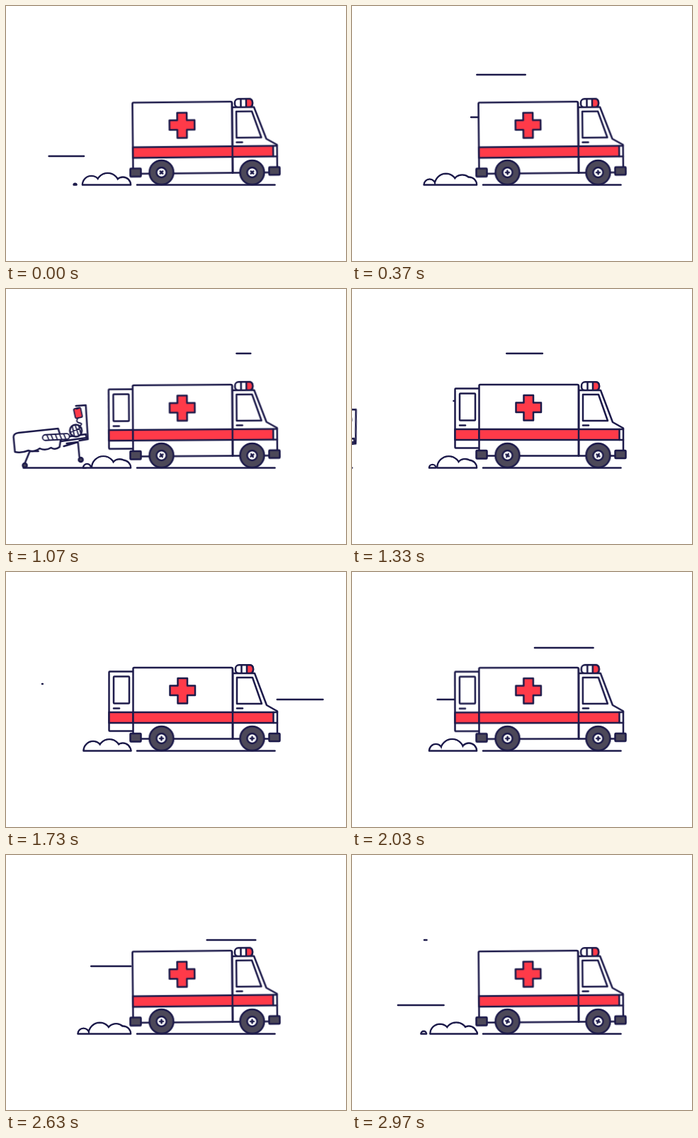
Write an HTML page that moves like this. It is 480 by 360 pixels and loops after 3.01 s.

```html
<!DOCTYPE html>
<html lang="en">
<head>
<meta charset="utf-8">
<title>Ambulance</title>
<style>
  html, body { margin: 0; width: 100%; height: 100%; overflow: hidden; background: #fff; }
  svg { display: block; width: 480px; height: 360px; }
  .ink { fill: none; stroke: #1c1a4a; stroke-width: 2.5; stroke-linecap: round; stroke-linejoin: round; }
  .white { fill: #fff; }
  .red { fill: #ff3a49; }
  .grey { fill: #4c4859; }
  .thin { stroke-width: 1.8; }

  .van { transform-origin: 320px 236px; animation: wobble 376.25ms -357ms ease-in-out infinite; }
  .door { transform-origin: 180px 0; animation: door 3010ms ease-out infinite; }
  .hand { animation: hand 3010ms ease-in-out infinite; }
  .roll { animation: roll 3010ms linear infinite; }
  .bed { transform-origin: 27px 249px; animation: bed 3010ms linear infinite; }
  .hub { animation: spin 602ms linear infinite; }

  @keyframes wobble {
    0%, 100% { transform: rotate(-.6deg); }
    50% { transform: none; }
  }
  @keyframes door {
    0%, 22.9% { transform: scaleX(0); visibility: hidden; }
    23% { transform: scaleX(.05); visibility: visible; }
    26.6%, 81% { transform: none; visibility: visible; }
    86.3% { transform: scaleX(.05); visibility: visible; }
    86.4%, 100% { transform: scaleX(0); visibility: hidden; }
  }
  @keyframes hand {
    0%, 73.5% { transform: translateX(14px); }
    77%, 100% { transform: none; }
  }
  @keyframes roll {
    0%, 23.26% { transform: translateX(182px); }
    35.55% { transform: none; }
    46.51%, 100% { transform: translateX(-143px); }
  }
  @keyframes bed {
    0%, 23.26% { transform: translateY(-18px) rotate(4deg); }
    28.24% { transform: translateY(-14px) rotate(2deg); }
    32.23% { transform: rotate(-3deg); }
    35.55% { transform: none; }
    39.87%, 100% { transform: rotate(4deg); }
  }
  @keyframes spin { to { transform: rotate(360deg); } }
</style>
</head>
<body>
<svg viewBox="0 0 480 360">
  <defs>
    <clipPath id="outside"><rect width="179" height="360"/></clipPath>
    <clipPath id="above"><rect width="480" height="252.5"/></clipPath>
    <g id="wheel">
      <circle class="ink grey" r="17"/>
      <circle class="ink white" r="7"/>
    </g>
  </defs>

  <path id="wind" class="ink"/>

  <g clip-path="url(#outside)">
    <g class="roll ink">
      <path d="M25 252.5H113"/>
      <g class="bed">
        <path d="M27 246L34 229H46M104 237L102 216L82 222M102 216L86 218"/>
        <circle class="grey" cx="27" cy="249" r="3"/>
        <circle class="grey" cx="106" cy="241" r="3"/>
        <path class="white" d="M99 165L113 164L116 212L104 214"/>
        <path class="white" d="M76 210L113 205L114 210L78 215Z"/>
        <path class="thin" d="M102 182Q98 188 104 189T104 194"/>
        <rect class="red thin" x="97" y="168" width="10" height="14" rx="2" transform="rotate(-12 102 175)"/>
        <path d="M100 169L103 168"/>
        <circle class="white" cx="99" cy="200" r="8.5"/>
        <path class="thin" d="M94 194L97 208M98 192L103 207M103 193L106 204M92 202L106 196"/>
        <path class="white" d="M13 230L11 209Q11 204 18 203L74 197L78 210L76 223Q70 228 64 224Q56 229 48 225Q40 231 32 228Q22 232 13 230Z"/>
        <rect class="white thin" x="52" y="205" width="38" height="8" rx="4" transform="rotate(-3 70 209)"/>
        <path class="thin" d="M58 206L61 213M64 206L67 213M70 205L73 213M76 205L79 212M82 205L85 212"/>
      </g>
    </g>
  </g>

  <g clip-path="url(#above)">
    <path id="dustEdge" class="ink"/>
    <path id="dustFill" class="white"/>
  </g>
  <path id="dustBase" class="ink"/>

  <path class="ink" d="M185 252.5H379.500"/>

  <g class="van ink">
    <g class="door">
      <rect class="hand white" x="135" y="182.500" width="18" height="9" rx="4.5"/>
      <rect class="white" x="145.500" y="140.500" width="35" height="84" rx="1"/>
      <rect x="152" y="147.500" width="22" height="38" rx="1"/>
      <path d="M152 192.500H160"/>
      <rect class="red" x="145.500" y="198" width="35" height="15"/>
    </g>
    <rect class="white" x="324" y="131.300" width="25" height="12" rx="5"/>
    <path class="red" d="M340 131.300H344Q349 131.300 349 137.300T344 143.300H340Z"/>
    <path d="M332.500 131.300V143"/>
    <path class="white" d="M320 143H351L368 188L383 196.500V235.500H320Z"/>
    <path class="white" d="M181 135H318Q320 135 320 137V235.500H179.500V136.500Q179.500 135 181 135Z"/>
    <rect class="red" x="179.500" y="198" width="198" height="15"/>
    <path d="M377.500 198H383M377.500 213H383M320 137V235"/>
    <path class="white" d="M326 149H348L361 186H326Z"/>
    <path d="M326 192.500H334"/>
    <path class="red" d="M242.500 150H256V160.500H267V174H256V185.500H242.500V174H231.500V160.500H242.500Z"/>
    <rect class="grey" x="175.500" y="228" width="15" height="11.500" rx="1"/>
    <rect class="grey" x="371.500" y="228" width="15" height="11" rx="1"/>
  </g>

  <g transform="translate(219.500 235)">
    <use href="#wheel"/>
    <path class="ink hub" d="M-1.700 -1.700L1.700 1.700M1.700 -1.700L-1.700 1.700"/>
  </g>
  <g transform="translate(347.500 235)">
    <use href="#wheel"/>
    <path class="ink hub" d="M-1.700 -1.700L1.700 1.700M1.700 -1.700L-1.700 1.700"/>
  </g>
</svg>
<script>
  const LOOP = 3010, GROUND = 252.5;
  const el = id => document.getElementById(id);
  const clamp = (v, lo = 0, hi = 1) => Math.min(hi, Math.max(lo, v));
  const ease = p => (1 - Math.cos(Math.PI * clamp(p))) / 2;

  // y, right end, left end, start ms, travel ms, lag of the tail in ms
  const streaks = [
    [157, 404, 110, 60, 440, 90],
    [97, 380, 130, 70, 420, 80],
    [119, 390, 63, 500, 480, 90],
    [180, 445, 200, 700, 400, 90],
    [158, 350, 51, 925, 650, 178],
    [91, 346, 160, 933, 640, 113],
    [180, 452, 112, 1582, 500, 112],
    [107, 400, 104, 1802, 470, 90],
    [157, 409, 109, 2193, 500, 95],
    [212, 380, 60, 2234, 800, 184],
    [120, 385, 102, 2435, 480, 90]
  ];

  function drawWind(t) {
    let d = '';
    for (const [y, from, to, start, dur, lag] of streaks) {
      const age = (t - start + LOOP) % LOOP;
      const at = ms => from + (to - from) * ease(ms / dur);
      const head = at(age), tail = at(age - lag);
      if (tail - head > 0.5) d += `M${tail} ${y}H${head}`;
    }
    el('wind').setAttribute('d', d);
  }

  const dome = (x, r) => `M${x - r} ${GROUND}a${r} ${r} 0 0 1 ${2 * r} 0`;

  function drawDust(t) {
    // The cloud's tail is held together mid-loop and breaks up around the seam.
    const limit = 94 + 15 * (ease((t - 400) / 200) - ease((t - 2250) / 700));
    const phase = (0.45 + t * 12 / LOOP) % 1;
    const puffs = [[165, 11]];
    for (let k = 0; k < 4; k++) {
      const x = 177 - 23 * (phase + k);
      const u = clamp((178 - x) / 84);
      const r = Math.min(16.5 * Math.sin(Math.PI * u ** 0.85), x - limit, 177 - x);
      if (r > 0.8) puffs.push([x, r]);
    }
    const join = f => puffs.map(([x, r]) => f(x, r)).join('');
    el('dustEdge').setAttribute('d', join(dome));
    el('dustFill').setAttribute('d', join((x, r) => dome(x, Math.max(0.1, r - 1.2))));
    el('dustBase').setAttribute('d', join((x, r) => `M${x - r} ${GROUND}H${x + r}`));
  }

  const start = performance.now();
  function frame() {
    const t = (performance.now() - start) % LOOP;
    drawWind(t);
    drawDust(t);
    requestAnimationFrame(frame);
  }
  frame();
</script>
</body>
</html>
```
